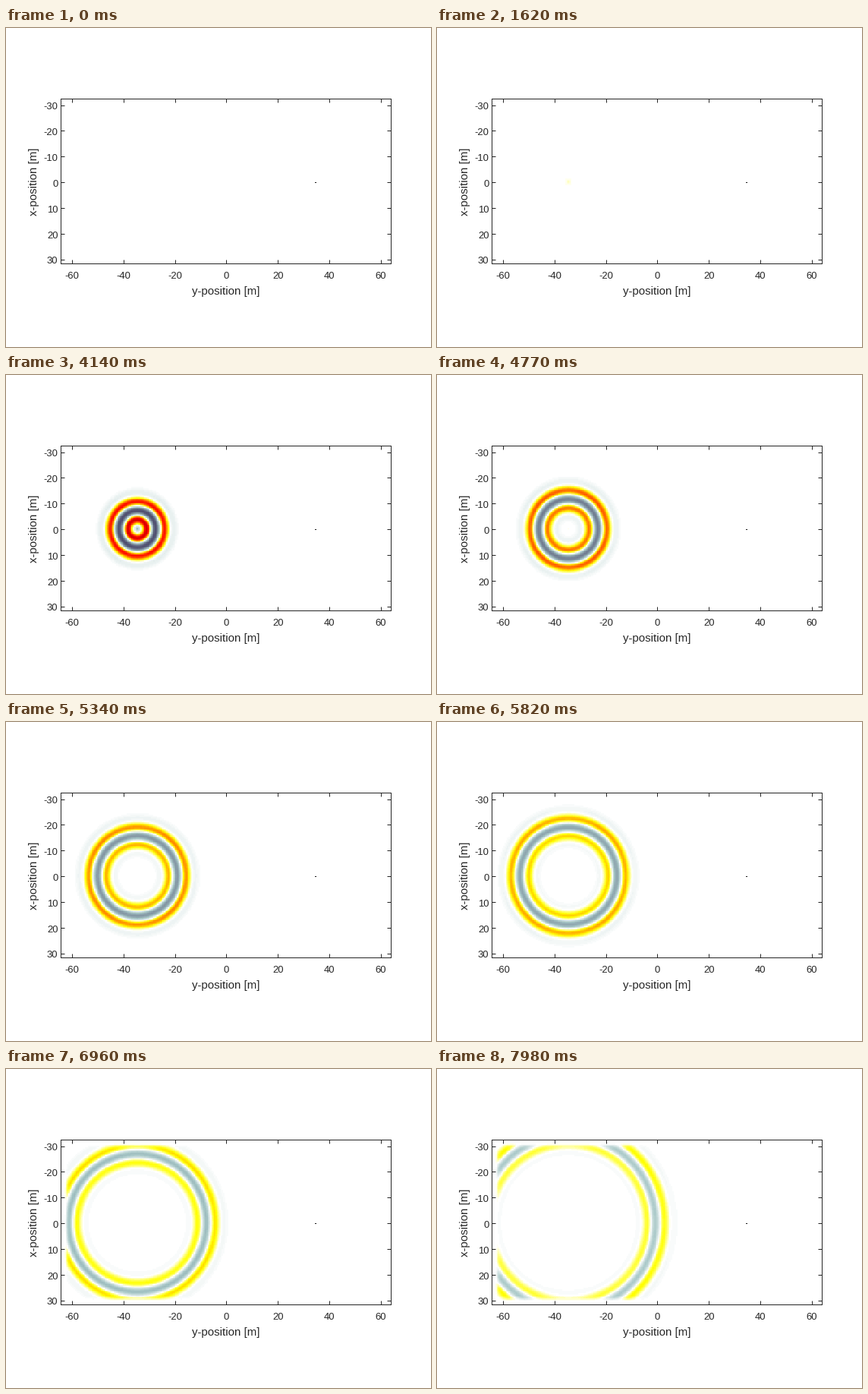
These frames come from a looping animation (560x420 px, 8000 ms). A matplotlib script:

```python
import numpy as np
import matplotlib.pyplot as plt
from matplotlib.animation import FuncAnimation
from matplotlib.colors import ListedColormap, TwoSlopeNorm
from matplotlib.patches import Rectangle
from matplotlib.transforms import ScaledTranslation

W, H, DPI = 560, 420, 100
FRAMES, LOOP_MS = 267, 8000
ROWS, COLS, CELL = 128, 256, 0.5      # grid, cell size in metres
STEP = 0.21                           # metres travelled per frame
WAVELENGTH, WIDTH, DELAY = 8.3, 23, 100
SRC = (64, 59)
PML, PML_MAX, LOSS = 8, 4.0, 0.0034
INK = (0.15, 0.15, 0.15)


def pt(px):
    return px * 72 / DPI


def absorber(pos, n):
    """Per-step damping exponent, growing cubically inside the border."""
    depth = np.maximum(np.maximum(PML - pos, pos - (n - 1 - PML)), 0)
    return PML_MAX * (depth / PML) ** 3


def pulse(k):
    t = k - DELAY
    return -np.exp(-(t / WIDTH) ** 2) * np.sin(2 * np.pi * STEP * t / WAVELENGTH)


def simulate():
    """Split-field FDTD of a point source in an absorbing box."""
    s = STEP / CELL
    i, j = np.arange(ROWS), np.arange(COLS)
    damp_r = np.exp(-absorber(i, ROWS) - LOSS)[:, None]
    damp_c = np.exp(-absorber(j, COLS) - LOSS)[None, :]
    damp_hr = np.exp(-absorber(i[:-1] + 0.5, ROWS))[:, None]
    damp_hc = np.exp(-absorber(j[:-1] + 0.5, COLS))[None, :]
    er, ec = np.zeros((ROWS, COLS)), np.zeros((ROWS, COLS))
    hr, hc = np.zeros((ROWS - 1, COLS)), np.zeros((ROWS, COLS - 1))
    out = np.zeros((FRAMES, ROWS, COLS), dtype=np.float32)
    for k in range(1, FRAMES):
        e = er + ec
        hr = damp_hr * hr + s * np.diff(e, axis=0)
        hc = damp_hc * hc + s * np.diff(e, axis=1)
        er *= damp_r
        ec *= damp_c
        er[1:-1] += s * np.diff(hr, axis=0)
        ec[:, 1:-1] += s * np.diff(hc, axis=1)
        er[SRC] += pulse(k) / 2
        ec[SRC] += pulse(k) / 2
        out[k] = er + ec
    return out * (0.43 / out[178].max())


field = simulate()

plt.rcParams["font.family"] = "Liberation Sans"
plt.rcParams["axes.unicode_minus"] = False

ramp = np.linspace(0, 1, 64)
cmap = ListedColormap(np.vstack([plt.cm.bone(ramp), plt.cm.hot(ramp[::-1])]))

fig = plt.figure(figsize=(W / DPI, H / DPI), dpi=DPI, facecolor="white")
left, right, top, bottom = 72.45, 506.6, 93.4, 310.4
ax = fig.add_axes([left / W, 1 - bottom / H, (right - left) / W, (bottom - top) / H])
image = ax.imshow(field[0], cmap=cmap, norm=TwoSlopeNorm(0, -1.6, 1), aspect="auto",
                  interpolation="nearest", extent=(-64.25, 63.75, 31.75, -32.25))
ax.set_ylim(31.61, -32.39)

ax.set_xticks(range(-60, 61, 20))
ax.set_yticks(range(-30, 31, 10))
ax.tick_params(direction="in", top=True, right=True, length=pt(5), width=pt(1),
               color=INK, labelcolor=INK, labelsize=pt(13))
ax.tick_params(axis="x", pad=pt(10.5))
ax.tick_params(axis="y", pad=pt(4))
drop = ScaledTranslation(0, -1 / DPI, fig.dpi_scale_trans)
for text in ax.get_yticklabels():
    text.set_transform(text.get_transform() + drop)
for spine in ax.spines.values():
    spine.set(color=INK, linewidth=pt(1))

label = dict(fontsize=pt(15), color=INK, ha="center", va="baseline",
             rotation_mode="anchor")
fig.text(290 / W, 1 - 351 / H, "y-position [m]", **label)
fig.text(41 / W, 1 - 202 / H, "x-position [m]", rotation=90, **label)

# receiver
fig.add_artist(Rectangle((407 / W, 1 - 204 / H), 2 / W, 1 / H,
                         facecolor="black", linewidth=0))


def draw(k):
    image.set_data(field[k])
    return [image]


anim = FuncAnimation(fig, draw, frames=FRAMES, interval=LOOP_MS / FRAMES,
                     init_func=lambda: draw(0), repeat=True, repeat_delay=0)
plt.show()
```
